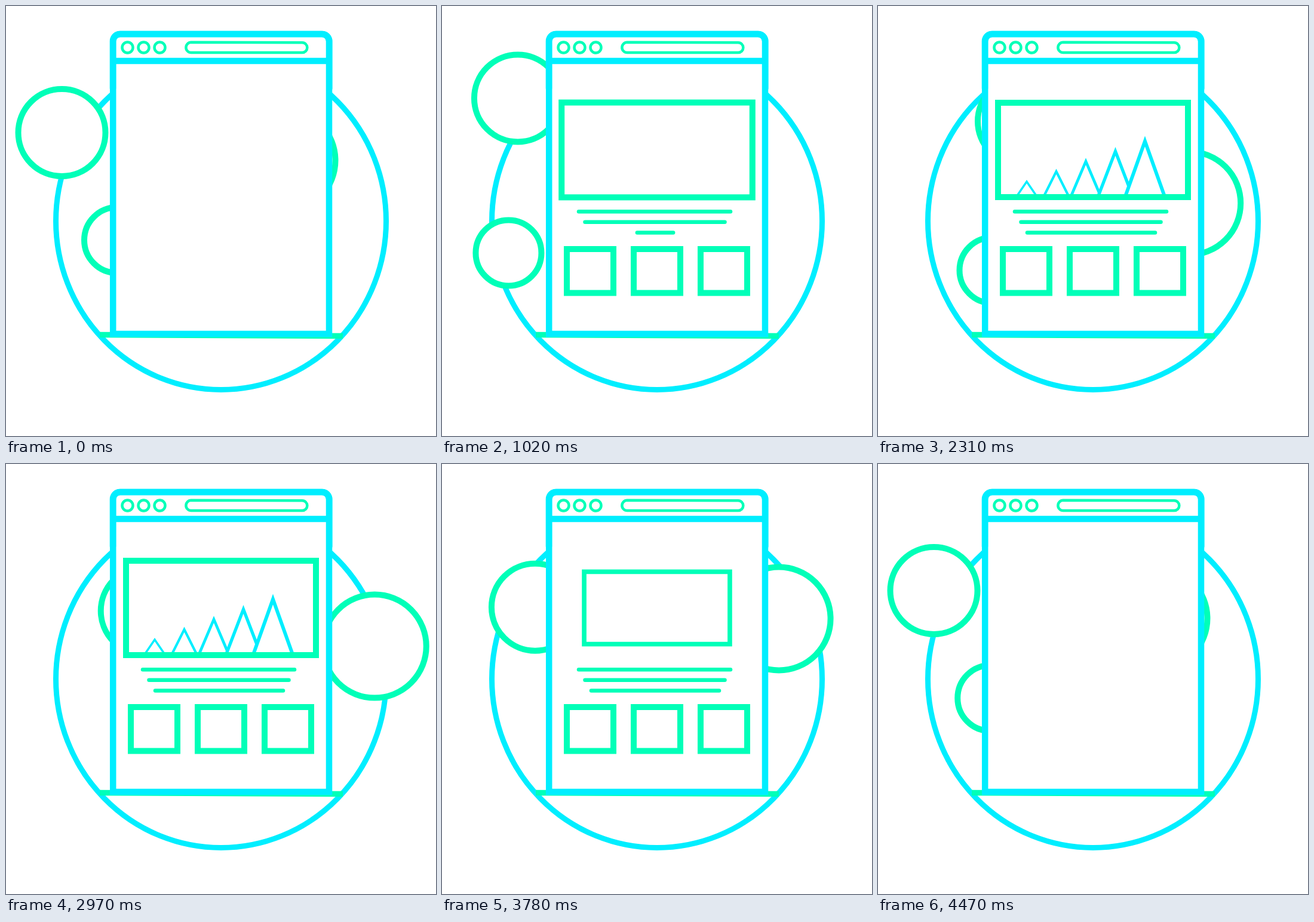
Animation, 720 px wide and 720 px high, one loop 4.5 s. Source, as an HTML page:

```html
<!DOCTYPE html>
<html lang="en">
<head>
<meta charset="utf-8">
<title>Browser window</title>
<style>
  html, body { margin: 0; width: 100%; height: 100%; overflow: hidden; background: #fff; }
  svg { display: block; width: 100%; height: 100%; }
  .c { stroke: #00eeff; }
  .g { stroke: #00ffb8; }
</style>
</head>
<body>
<svg viewBox="0 0 720 720" fill="#fff">
  <ellipse class="c" cx="360" cy="360" rx="276.5" ry="282.5" fill="none" stroke-width="9"/>
  <path class="g" d="M157 550.5L564 552.5" stroke-width="9.5"/>
  <g id="orbs" class="g" stroke-width="10"></g>
  <path class="c" d="M179.2 549V59a12 12 0 0 1 12-12H529a12 12 0 0 1 12 12V549Z" stroke-width="10.5"/>
  <path class="c" d="M179 138V59a12 12 0 0 1 12-12H529.3a12 12 0 0 1 12 12V138M179 92H541" fill="none" stroke-width="10.5" stroke-linecap="round"/>
  <g id="bar" class="g" stroke-width="4.5">
    <path d="M310 60.8L496 61.3A8.3 8.3 0 0 1 496 78H310A8.6 8.6 0 0 1 310 60.8Z"/>
  </g>
  <g id="peaks" class="c" stroke-miterlimit="10"></g>
  <g id="parts" class="g" fill="none"></g>
</svg>
<script>
const LOOP = 4500, STEP = 30;

function add(parent, tag, attrs) {
  const el = document.createElementNS("http://www.w3.org/2000/svg", tag);
  for (const k in attrs) el.setAttribute(k, attrs[k]);
  return document.getElementById(parent).appendChild(el);
}

const make = (n, fn) => Array.from({ length: n }, (_, i) => fn(i));
const smooth = u => u * u * (3 - 2 * u);
const backOut = u => 1 + 2.70158 * (u - 1) ** 3 + 1.70158 * (u - 1) ** 2;
const ramp = (t, start, dur, ease = smooth) =>
  ease(Math.max(0, Math.min(1, (t - start) / dur)));

// Smooth closed path through points evenly spaced in time (odd count)
function orbit(pts, u) {
  const n = pts.length, at = [0, 0];
  pts.forEach((p, k) => {
    const a = Math.PI * (u - k / n), s = Math.sin(a);
    const w = Math.abs(s) < 1e-9 ? 1 : Math.sin(n * a) / (n * s);
    at[0] += p[0] * w;
    at[1] += p[1] * w;
  });
  return at;
}

const orbs = [
  { r: 73, period: LOOP - STEP, pts: [[93.5, 212], [94.5, 162.8], [150.5, 160.5],
    [208, 176], [248, 213], [212.3, 252.8], [151, 238]] },
  { r: 55, period: LOOP, pts: [[186, 392], [134.5, 396.3], [111.5, 429],
    [160, 443.5], [211.5, 443], [256, 426], [238.5, 394]] },
  { r: 86.5, period: LOOP - STEP, pts: [[465, 258.5], [377, 268], [380, 318],
    [470, 329], [558, 328], [628, 286], [555.5, 259]] }
];
for (const o of orbs) o.el = add("orbs", "circle", { r: o.r });

make(3, i => add("bar", "circle", { cx: 203.5 + 27 * i, cy: 69.5, r: 9 }));

const peaks = make(5, i => {
  const x = 249 + 49.5 * i, y = 294 - 16.9 * i, w = 17 + 4 * i;
  return { x, on: 2120 - 195 * i, off: 3000 + 125 * i, el: add("peaks", "path", {
    d: `M${x - w} 319L${x} ${y}L${x + w} 319`, "stroke-width": 3.5 + 0.6 * i }) };
});

const chart = add("parts", "rect", { x: 201, y: 162, width: 318, height: 158, "stroke-width": 10 });

const lines = make(3, i => ({
  x: 356 + 0.5 * i, y: 344.2 + 17.6 * i, w: 127 - 10 * i, on: 465 + 225 * i, off: 3950 - 60 * i,
  el: add("parts", "path", { "stroke-width": 6.5, "stroke-linecap": "round" })
}));

const boxes = make(3, i => {
  const x = 248 + 112 * i;
  return { x, el: add("parts", "rect", { x: x - 39, y: 407, width: 78, height: 73.5, "stroke-width": 10 }) };
});

const show = (el, s) => el.setAttribute("visibility", s > 0.001 ? "visible" : "hidden");

function scale(el, s, x, y) {
  show(el, s);
  el.setAttribute("transform", `translate(${x} ${y}) scale(${s}) translate(${-x} ${-y})`);
}

function draw(t) {
  for (const o of orbs) {
    const [x, y] = orbit(o.pts, t / o.period % 1);
    o.el.setAttribute("cx", x);
    o.el.setAttribute("cy", y);
  }
  for (const p of peaks)
    scale(p.el, ramp(t, p.on, 180) - ramp(t, p.off, 180), p.x, 320);

  scale(chart, ramp(t, 652, 390, backOut) - ramp(t, 3686, 300), 360, 241);

  for (const l of lines) {
    const s = ramp(t, l.on, 300) - ramp(t, l.off, 260);
    show(l.el, s);
    l.el.setAttribute("d", `M${l.x - l.w * s} ${l.y}H${l.x + l.w * s}`);
  }
  const s = ramp(t, 328, 430) - ramp(t, 3930, 380);
  for (const b of boxes) scale(b.el, s, b.x, 443.75);
}

const begin = performance.now();
function tick() {
  const t = (performance.now() - begin) % LOOP;
  draw(Math.floor(t / STEP) * STEP);
  requestAnimationFrame(tick);
}
tick();
</script>
</body>
</html>
```
